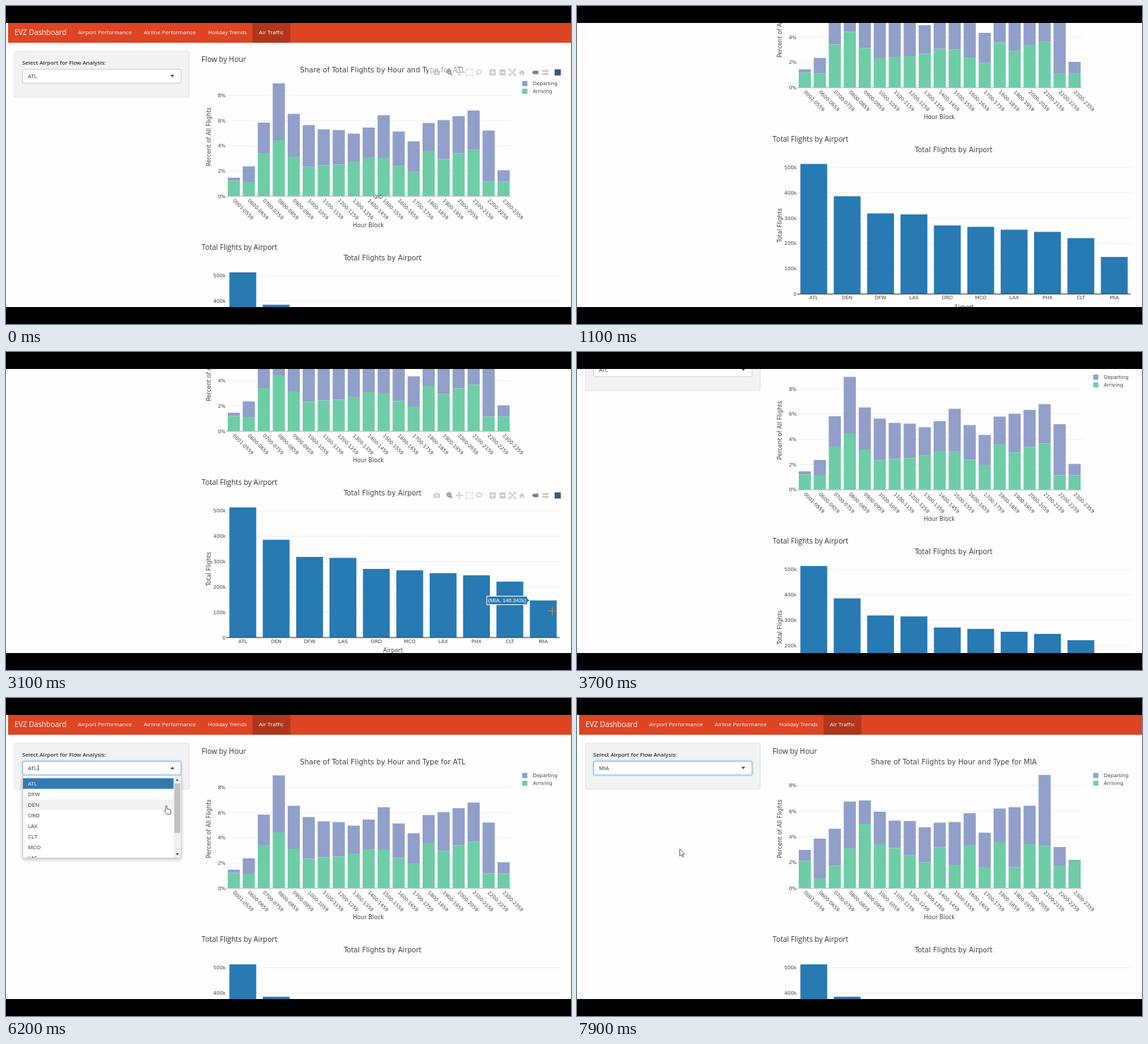
An HTML page with a canvas for the animation above (8 s loop, 800 by 450 pixels).

```html
<!DOCTYPE html>
<html lang="en">
<head>
<meta charset="utf-8">
<title>Flight dashboard</title>
<style>
  html, body { margin: 0; width: 100%; height: 100%; overflow: hidden; background: #000; }
  canvas { display: block; width: 800px; height: 450px; }
</style>
</head>
<body>
<canvas id="stage"></canvas>
<script>
const LOOP = 8000;
const UI = '"Open Sans", "Noto Sans", sans-serif';
const PLOT = '"DejaVu Sans", sans-serif';
const PURPLE = '#919fca', GREEN = '#6ecda6', BLUE = '#277ab2';

const hours = ['0001-0559'];
for (let h = 6; h < 24; h++) {
  const hh = String(h).padStart(2, '0');
  hours.push(`${hh}00-${hh}59`);
}

// Share of flights per hour block, in percent; unit is pixels per percent.
const shares = {
  ATL: {
    unit: 17.83,
    total: [1.46, 2.36, 5.83, 8.95, 6.53, 5.64, 5.3, 5.24, 4.96, 5.44, 6.42, 5.13, 4.35, 5.8, 6.03, 6.34, 6.79, 5.2, 2.05],
    arriving: [1.2, 1.12, 3.42, 4.43, 3.14, 2.33, 2.44, 2.5, 2.7, 3.08, 3.03, 2.38, 1.96, 3.59, 2.94, 3.39, 3.67, 1.15, 1.15]
  },
  MIA: {
    unit: 18.15,
    total: [2.98, 3.86, 4.63, 6.75, 6.83, 5.95, 5.26, 5.23, 4.74, 5.1, 5.15, 5.84, 4.32, 6.2, 6.31, 6.42, 8.82, 3.2, 2.2],
    arriving: [2.12, .77, 1.74, 3.09, 5.01, 3.42, 3.11, 2.56, 2.01, 3.17, 1.82, 3.36, 1.6, 3.58, 1.63, 3.42, 3.28, 1.76, 2.15]
  }
};
const flights = [['ATL', 513.418], ['DEN', 385.742], ['DFW', 318.156], ['LAS', 314.271], ['ORD', 270.683],
  ['MCO', 265.127], ['LAX', 253.864], ['PHX', 245.391], ['CLT', 220.518], ['MIA', 146.342]];
const options = ['ATL', 'DFW', 'DEN', 'ORD', 'LAX', 'CLT', 'MCO', 'LAS', 'PHX', 'MIA'];

// Pointer track: time, x, y
const pointerTrack = [[0, 527, 270], [100, 527, 270], [700, 520, 330], [1700, 520, 330], [2100, 340, 350],
  [2400, 340, 350], [2600, 790, 395], [2800, 790, 395], [3100, 773, 366], [4200, 773, 366], [4700, 741, 221],
  [4950, 741, 221], [5500, 235, 99], [5800, 235, 99], [6200, 227, 152], [6400, 227, 152], [6800, 145.5, 217],
  [7200, 145.5, 217], [7500, 145.5, 213.7]];

// Toolbar icons in a 10 x 10 box: centre x, path, colour, filled
const LIGHT = '#c9c9cb', DARK = '#7d7d80';
const icons = [
  [610, 'M0 2h3l1-1.5h2l1 1.5h3v7H0zM7 5.3a2 2 0 1 0-4 0a2 2 0 1 0 4 0', LIGHT, true],
  [628, 'M7.3 4a3.2 3.2 0 1 0-6.4 0a3.2 3.2 0 1 0 6.4 0M6.5 6.5l3 3M2.6 4h3M4.1 2.5v3', DARK],
  [642, 'M0 5h10M5 0v10M3.7 1.5L5 0l1.3 1.5M3.7 8.5L5 10l1.3-1.5M1.5 3.7L0 5l1.5 1.3M8.5 3.7L10 5 8.5 6.3', LIGHT],
  [656, 'M0 2V0h2M4 0h2M8 0h2v2M10 4v2M10 8v2H8M6 10H4M2 10H0V8M0 6V4', LIGHT],
  [670, 'M3 7C-1 6 0 1 5 1s6 6 0 6H3c-2 2 1 2 0 3', LIGHT],
  [689, 'M0 0h10v10H0zM4.2 2v2.2H2v1.6h2.2V8h1.6V5.8H8V4.2H5.8V2z', LIGHT, true],
  [703, 'M0 0h10v10H0zM2 4.2v1.6h6V4.2z', LIGHT, true],
  [717, 'M0 3V0h3M7 0h3v3M10 7v3H7M3 10H0V7M1 1l8 8M9 1l-8 8', LIGHT],
  [730.5, 'M5 .5L10 5.5H8.6V9.5H6V6.5H4v3H1.4v-4H0z', LIGHT, true],
  [749, 'M0 5l3-3h7.5v6H3z', DARK, true],
  [763, 'M0 2.5L2 1h9v3H2zM0 7.5L2 6h9v3H2z', LIGHT, true]
].map(([x, d, color, filled]) => ({ x, path: new Path2D(d), color, filled }));

const arrowPath = new Path2D('M0 0v10l2.3-2.1 1.6 3.4 1.5-.7-1.6-3.3h3.2z');
const handPath = new Path2D('M-1 1.2a1 1 0 0 1 2 0V5l4.2.9q1.6.4 1.4 2L6 12.5H.8L-2.4 8.2q-.3-1.4 1.4-.5z');
const resizePath = new Path2D('M-6.5 0l3.5-3v2h6v-2l3.5 3-3.5 3v-2h-6v2z');

const canvas = document.getElementById('stage');
const ratio = window.devicePixelRatio || 1;
canvas.width = 800 * ratio;
canvas.height = 450 * ratio;
const c = canvas.getContext('2d');

const ramp = (t, a, b) => Math.min(1, Math.max(0, (t - a) / (b - a)));
const smooth = u => u * u * (3 - 2 * u);
const shown = (t, a, b, fade = 200) => Math.min(ramp(t, a, a + fade), 1 - ramp(t, b, b + fade));

function rect(x, y, w, h, color) {
  c.fillStyle = color;
  c.fillRect(x, y, w, h);
}

function box(x, y, w, h, fill, stroke, radius = 2) {
  c.beginPath();
  c.roundRect(x, y, w, h, radius);
  c.fillStyle = fill;
  c.fill();
  c.strokeStyle = stroke;
  c.lineWidth = 1;
  c.stroke();
}

// y is the middle of the capital letters.
function text(str, x, y, size, { font = PLOT, color = '#444', align = 'left', weight = 400, angle = 0 } = {}) {
  c.save();
  c.translate(x, y);
  c.rotate(angle);
  c.font = `${weight} ${size}px ${font}`;
  c.textAlign = align;
  c.fillStyle = color;
  c.fillText(str, 0, size * .36);
  c.restore();
}

function triangle(x, y, size, up) {
  const d = up ? -size * .55 : size * .55;
  c.beginPath();
  c.moveTo(x - size, y - d);
  c.lineTo(x + size, y - d);
  c.lineTo(x, y + d);
  c.fillStyle = '#333';
  c.fill();
}

function scrollAt(t) {
  const down = 157 * (1 - (1 - ramp(t, 850, 1200)) ** 3);
  return down * (1 - smooth(ramp(t, 3338, 4038)));
}

function pointerAt(t) {
  const i = pointerTrack.findLastIndex(p => p[0] <= t);
  const a = pointerTrack[i], b = pointerTrack[i + 1] || a;
  const u = a === b ? 0 : smooth(ramp(t, a[0], b[0]));
  return { x: a[1] + (b[1] - a[1]) * u, y: a[2] + (b[2] - a[2]) * u };
}

function drawNav() {
  rect(3, 23, 797, 29, '#dd4524');
  rect(349, 23, 53.5, 29, '#b0361b');
  const white = { font: UI, color: '#fff' };
  text('EVZ Dashboard', 12, 37.2, 10.3, white);
  [['Airport Performance', 102], ['Airline Performance', 195], ['Holiday Trends', 286], ['Air Traffic', 358]]
    .forEach(([label, x]) => text(label, x, 37.2, 7.95, white));
}

function drawPanel(t) {
  const open = t >= 5600 && t < 7100, focused = t >= 5600;
  box(12, 64, 247.3, 65, '#f2f2f4', '#e2e2e4');
  text('Select Airport for Flow Analysis:', 23, 80.6, 7.8, { font: UI, weight: 600, color: '#333' });
  c.save();
  if (focused) { c.shadowColor = 'rgba(102,175,233,.6)'; c.shadowBlur = 3 * ratio; }
  box(23.5, 89.5, 224.5, 19.5, '#fff', focused ? '#8cc2ea' : '#ccc');
  c.restore();
  text(t < 7100 ? 'ATL' : 'MIA', 31, 99.2, 7.9, { font: UI, color: '#333' });
  if (open) rect(45, 94.5, .8, 9, '#333');
  triangle(235.5, 99, 2.8, open);
}

function drawDropdown(t, pointer) {
  const offset = 38 * smooth(ramp(t, 6400, 6750)), rowHeight = 15.07;
  c.save();
  c.shadowColor = 'rgba(0,0,0,.2)';
  c.shadowBlur = 5 * ratio;
  c.shadowOffsetY = 2 * ratio;
  box(23.5, 109.5, 224.5, 117, '#fff', '#ccc');
  c.restore();
  c.save();
  c.beginPath();
  c.rect(24, 110.5, 213.5, 115.5);
  c.clip();
  options.forEach((name, i) => {
    const y = 113.5 + i * rowHeight - offset;
    const hovered = pointer.y >= y && pointer.y < y + rowHeight;
    if (i === 0) rect(24, y, 214, rowHeight, '#337ab5');
    else if (hovered) rect(24, y, 214, rowHeight, '#f2f2f4');
    text(name, 31, y + 7.6, 7.9, { font: UI, color: i ? '#333' : '#fff' });
  });
  c.restore();
  rect(237.5, 110.5, 10, 115.5, '#f1f1f1');
  rect(238.3, 121 + offset * .68, 8.4, 70, '#c1c1c1');
  triangle(242.5, 116, 2.2, true);
  triangle(242.5, 221, 2.2, false);
}

function drawHourChart(airport) {
  const { unit, total, arriving } = shares[airport], base = 269;
  text('Flow by Hour', 277, 75.5, 10.3, { font: UI, color: '#333' });
  text(`Share of Total Flights by Hour and Type for ${airport}`, 533.5, 90.3, 10.05, { align: 'center' });
  for (let p = 0; p <= 8; p += 2) {
    const y = base - p * unit;
    rect(312, y - .5, 403, 1, '#eee');
    text(p + '%', 311, y, 7, { align: 'right' });
  }
  hours.forEach((label, i) => {
    const x = 314 + i * 21.22, low = arriving[i] * unit, high = total[i] * unit;
    rect(x, base - high, 17.2, high - low, PURPLE);
    rect(x, base - low, 17.2, low, GREEN);
    text(label, x + 8.5, base + 5, 7, { angle: Math.PI / 4 });
  });
  rect(312, base - .3, 403, .9, '#aab5b0');
  text('Hour Block', 513, 310.3, 8.15, { align: 'center' });
  text('Percent of All Flights', 287, 185, 8.15, { align: 'center', angle: -Math.PI / 2 });
  [['Departing', PURPLE], ['Arriving', GREEN]].forEach(([label, color], i) => {
    const y = 109.7 + i * 10.9;
    rect(731, y - 3.6, 7.2, 7.2, color);
    text(label, 746, y, 7);
  });
}

const barLeft = i => 316.3 + i * 47.27;
const barTop = i => 561 - flights[i][1] * .3585;

function drawAirportChart() {
  text('Total Flights by Airport', 277, 341.5, 10.3, { font: UI, color: '#333' });
  text('Total Flights by Airport', 533.3, 356.5, 9.8, { align: 'center' });
  for (let k = 0; k <= 500; k += 100) {
    const y = 561 - k * .3585;
    rect(312, y - .5, 472, 1, '#eee');
    text(k ? k + 'k' : '0', 311, y, 7, { align: 'right' });
  }
  flights.forEach(([name], i) => {
    rect(barLeft(i), barTop(i), 38, 561 - barTop(i), BLUE);
    text(name, barLeft(i) + 19, 566.3, 7, { align: 'center' });
  });
  rect(312, 560.5, 472, 1.1, '#444');
  text('Airport', 548, 579.5, 8.15, { align: 'center' });
  text('Total Flights', 287, 464, 8.15, { align: 'center', angle: -Math.PI / 2 });
}

function drawToolbar(y, alpha) {
  if (!alpha) return;
  c.save();
  c.globalAlpha = alpha;
  rect(598, y - 7.5, 190, 15, 'rgba(255,255,255,.55)');
  for (const { x, path, color, filled } of icons) {
    c.save();
    c.translate(x - 4.3, y - 4.3);
    c.scale(.86, .86);
    c.fillStyle = c.strokeStyle = color;
    c.lineWidth = 1.5;
    if (filled) c.fill(path, 'evenodd'); else c.stroke(path);
    c.restore();
  }
  rect(776.8, y - 4.4, 8.8, 8.8, '#3d5486');
  c.restore();
}

function drawTooltip(pointer, scroll) {
  const y = pointer.y + scroll;
  const i = flights.findIndex((_, n) => pointer.x >= barLeft(n) && pointer.x <= barLeft(n) + 38 && y >= barTop(n));
  if (i < 0) return;
  const label = `(${flights[i][0]}, ${flights[i][1].toFixed(3)}k)`;
  const side = i > 7 ? -1 : 1;
  c.save();
  c.translate(side < 0 ? barLeft(i) : barLeft(i) + 38, barTop(i));
  c.beginPath();
  [[0, 0], [3.5, -3], [3.5, -6], [61, -6], [61, 6], [3.5, 6], [3.5, 3]].forEach(([x, dy]) => c.lineTo(x * side, dy));
  c.closePath();
  c.fillStyle = BLUE;
  c.strokeStyle = '#fff';
  c.lineWidth = 1;
  c.fill();
  c.stroke();
  text(label, 32 * side, 0, 7.6, { font: '"Liberation Sans", Arial, sans-serif', color: '#fff', align: 'center' });
  c.restore();
}

function drawPointer(t, { x, y }) {
  if ((t >= 850 && t < 1700) || (t >= 3338 && t < 4200)) return;
  const overPlot = t > 4200 && t < 5500 && x > 312 && x < 715 && y > 105 && y < 269;
  c.save();
  c.translate(x, y);
  if ((t >= 100 && t < 3338) || overPlot) {
    c.globalCompositeOperation = 'difference';
    rect(-6, 0, 13, 1, '#fff');
    rect(0, -6, 1, 6, '#fff');
    rect(0, 1, 1, 6, '#fff');
  } else {
    const path = t < 100 ? resizePath : t >= 5450 && t < 7100 ? handPath : arrowPath;
    c.fillStyle = '#fff';
    c.strokeStyle = '#555';
    c.lineWidth = .9;
    c.fill(path);
    c.stroke(path);
  }
  c.restore();
}

function draw(t) {
  const scroll = scrollAt(t), pointer = pointerAt(t);
  c.setTransform(ratio, 0, 0, ratio, 0, 0);
  rect(0, 0, 800, 450, '#fefefe');
  c.save();
  c.translate(0, -scroll);
  drawNav();
  drawPanel(t);
  drawHourChart(t < 7400 ? 'ATL' : 'MIA');
  drawAirportChart();
  drawToolbar(94, t < 2000 ? 1 - ramp(t, 850, 1050) : shown(t, 4200, 5100));
  drawToolbar(360, shown(t, 1800, 3338));
  if (t >= 2000 && t < 3338) drawTooltip(pointer, scroll);
  if (t >= 5600 && t < 7100) drawDropdown(t, pointer);
  c.restore();
  drawPointer(t, pointer);
  rect(0, 0, 800, 24, '#000');
  rect(0, 426, 800, 24, '#000');
}

const start = performance.now();
function frame() {
  draw((performance.now() - start) % LOOP);
  requestAnimationFrame(frame);
}
frame();
</script>
</body>
</html>
```
